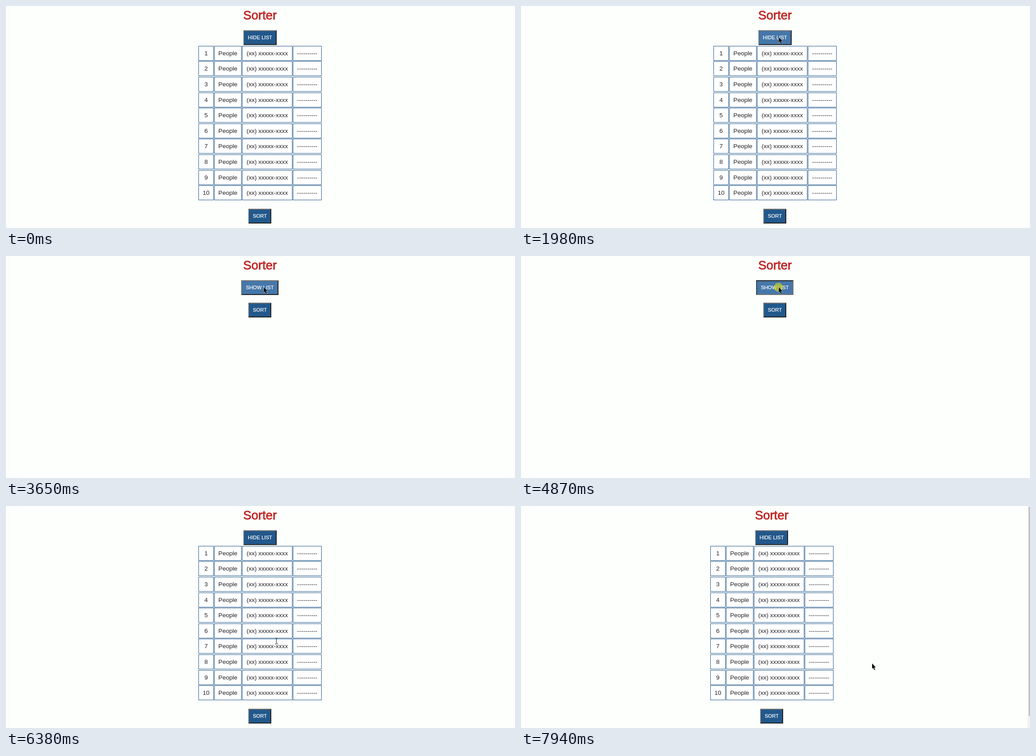
An HTML page with a canvas that plays this animation: 1132x495 px, repeating every 8 s.

```html
<!DOCTYPE html>
<html lang="en">
<head>
<meta charset="utf-8">
<title>Sorter</title>
<style>
  html, body { margin: 0; width: 100%; height: 100%; overflow: hidden; background: #fdfffd; }
  canvas { display: block; width: 1132px; height: 495px; }
</style>
</head>
<body>
<canvas id="stage" width="1132" height="495"></canvas>
<script>
const ctx = document.getElementById('stage').getContext('2d');
const LOOP = 8000;
const FONT = '"Liberation Sans", Arial, sans-serif';
const PAGE = '#fdfffd', BLUE = '#22588b', HOVER = '#4577a9';
const ROW_PITCH = 34.6, CELL_HEIGHT = 33;

const smooth = k => k * k * (3 - 2 * k);
const easeOut = k => 1 - (1 - k) ** 2;
const between = (t, a, b) => t >= a && t < b;

// Pointer gestures: each follows a curve bent towards one control point, in even time steps.
const moves = [
  { start: 200, end: 670, steps: 8, ease: smooth, from: [1061, 484], bend: [863, 434], to: [733, 320] },
  { start: 810, end: 1550, steps: 12, ease: easeOut, from: [717, 316], bend: [600, 275], to: [575, 98] },
  { start: 1620, end: 1840, steps: 4, ease: easeOut, from: [575, 92], bend: [574, 80], to: [573, 69] },
  { start: 5930, end: 6790, steps: 14, ease: smooth, from: [574, 74], bend: [627, 377], to: [578, 470] },
  { start: 7590, end: 7940, steps: 6, ease: smooth, from: [590, 464], bend: [690, 410], to: [780.5, 350.5] }
];
const presses = [[3510, 3650], [4870, 4990], [7260, 7390]];

const columns = [
  { x: 428, w: 34 }, { x: 463, w: 61, text: 'People' },
  { x: 525, w: 112, text: '(xx) xxxxx-xxxx' }, { x: 638, w: 64, text: '----------' }
];

function pointerAt(t) {
  const move = moves.filter(m => m.start <= t).pop();
  if (!move) return null;
  const { start, end, steps, ease, from, bend, to } = move;
  const last = steps - 1;
  const step = Math.min(last, Math.floor((t - start) / (end - start) * last + 1e-6));
  const k = ease(step / last);
  const [x, y] = from.map((a, i) => (1 - k) ** 2 * a + 2 * k * (1 - k) * bend[i] + k * k * to[i]);
  return { x, y };
}

const contains = (box, p) =>
  p && between(p.x, box.x, box.x + box.w) && between(p.y, box.y, box.y + box.h);

// Snaps both edges of a box to whole pixels.
function snap(x, y, w, h) {
  const left = Math.round(x), top = Math.round(y);
  return { x: left, y: top, w: Math.round(x + w) - left, h: Math.round(y + h) - top };
}

function label(text, x, y, size, color, thickness = 0) {
  ctx.font = `${size}px ${FONT}`;
  ctx.textAlign = 'center';
  ctx.fillStyle = color;
  ctx.fillText(text, x, y);
  if (thickness) {
    ctx.strokeStyle = color;
    ctx.lineWidth = thickness;
    ctx.strokeText(text, x, y);
  }
}

function trace(points) {
  ctx.beginPath();
  points.forEach(([x, y]) => ctx.lineTo(x, y));
  ctx.closePath();
}

function button(box, text, pointer, pressed) {
  const { x, y, w, h } = box;
  const over = contains(box, pointer);
  const edges = ['#767676', '#212121'];
  if (over && pressed) edges.reverse();
  ctx.fillStyle = edges[1];
  ctx.fillRect(x, y, w, h);
  ctx.fillStyle = edges[0];
  trace([[x, y], [x + w, y], [x + w - 2, y + 2], [x + 2, y + h - 2], [x, y + h]]);
  ctx.fill();
  ctx.fillStyle = over ? HOVER : BLUE;
  ctx.fillRect(x + 1.5, y + 2, w - 3.5, h - 4);
  label(text, x + w / 2, y + 20.2, 11.3, '#fff', 0.25);
}

function table(shift) {
  for (let row = 0; row < 10; row++) {
    const top = 88.7 + ROW_PITCH * row;
    for (const { x, w, text } of columns) {
      const cell = snap(x - shift, top, w, CELL_HEIGHT);
      ctx.fillStyle = '#fff';
      ctx.fillRect(cell.x, cell.y, cell.w, cell.h);
      ctx.strokeStyle = BLUE;
      ctx.lineWidth = 1;
      ctx.strokeRect(cell.x + 0.5, cell.y + 0.5, cell.w - 1, cell.h - 1);
      label(text || String(row + 1), x - shift + w / 2, top + 21, 13.6, '#24242a');
    }
  }
}

function arrow({ x, y }) {
  ctx.save();
  ctx.translate(x, y);
  trace([[0.4, 0.6], [0.4, 12.6], [3, 10.2], [5.1, 15.2], [7, 14.4], [4.9, 9.6], [8.4, 9.4]]);
  ctx.strokeStyle = '#fff';
  ctx.lineWidth = 1;
  ctx.stroke();
  ctx.fillStyle = '#000';
  ctx.fill();
  ctx.restore();
}

function textCursor({ x, y }) {
  const cx = Math.round(x), cy = Math.round(y);
  ctx.fillStyle = '#111';
  ctx.fillRect(cx, cy - 6, 1, 12);
  for (const edge of [cy - 7, cy + 6]) {
    ctx.fillRect(cx - 3, edge, 3, 1);
    ctx.fillRect(cx + 1, edge, 3, 1);
  }
}

function clickMark({ x, y }) {
  ctx.fillStyle = 'rgba(215, 215, 20, 0.63)';
  ctx.beginPath();
  ctx.arc(x - 0.5, y + 0.7, 10, 0, Math.PI * 2);
  ctx.fill();
}

function scrollbar() {
  ctx.fillStyle = '#f1f1f1';
  ctx.fillRect(1127, 0, 5, 495);
  ctx.fillStyle = '#c1c1c1';
  ctx.fillRect(1129, 2, 3, 466);
}

function draw(t) {
  const listOpen = !between(t, 3650, 4990);
  const scrolled = t >= 7390;
  const shift = scrolled ? 7.3 : 0;
  const pressed = presses.some(([down, up]) => between(t, down, up));
  const pointer = pointerAt(t);

  ctx.fillStyle = PAGE;
  ctx.fillRect(0, 0, 1132, 495);
  label('Sorter', 564.8 - shift, 30, 27.4, '#be2422', 0.8);

  const toggle = listOpen
    ? { text: 'HIDE LIST', x: 528.2, w: 73.4 }
    : { text: 'SHOW LIST', x: 523.2, w: 82.6 };
  button(snap(toggle.x - shift, 54, toggle.w, 33), toggle.text, pointer, pressed);
  if (listOpen) table(shift);
  button(snap(539.4 - shift, listOpen ? 452 : 104, 50.8, 33), 'SORT', pointer, pressed);
  if (scrolled) scrollbar();

  if (!pointer) return;
  if (pressed) clickMark(pointer);
  const overList = listOpen && contains({ x: 428 - shift, y: 89, w: 274, h: 344 }, pointer);
  (overList ? textCursor : arrow)(pointer);
}

const start = performance.now();
function tick() {
  draw((performance.now() - start) % LOOP);
  requestAnimationFrame(tick);
}
tick();
</script>
</body>
</html>
```
